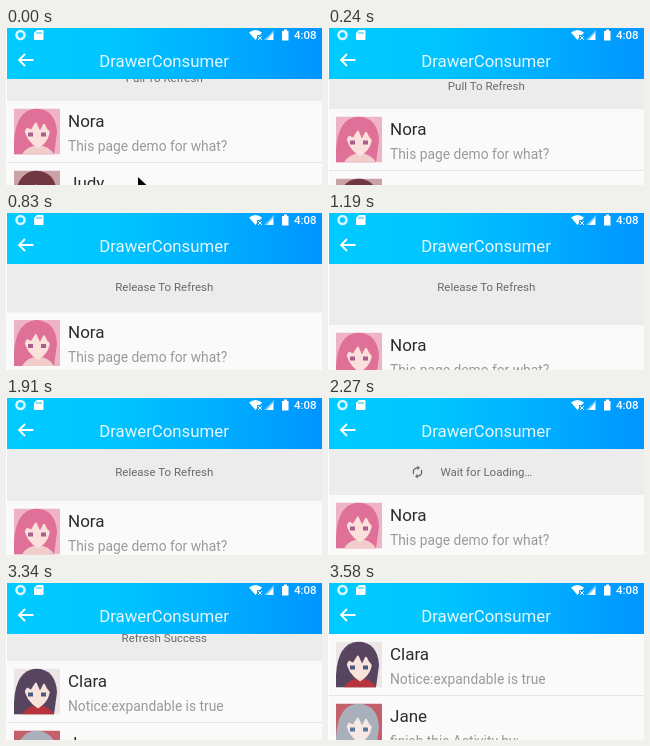
Animation of 316 by 157 pixels, one loop 3.76 s. Source, as an HTML page:

```html
<!DOCTYPE html>
<html lang="en">
<head>
<meta charset="utf-8">
<title>Pull to refresh</title>
<style>
  html, body { margin: 0; width: 100%; height: 100%; overflow: hidden; background: #ececec; }
  svg { display: block; width: 316px; height: 157px; font-family: Roboto, sans-serif; }
  .name { font-size: 17px; fill: #2b2b2b; }
  .note { font-size: 13.8px; fill: #9a9a9a; }
  #hint { font-size: 11.5px; fill: #6a6a6a; text-anchor: middle; }
</style>
</head>
<body>
<svg viewBox="0 0 316 157">
  <defs>
    <linearGradient id="sky">
      <stop stop-color="#00cbff"/>
      <stop offset=".35" stop-color="#00c4ff"/>
      <stop offset=".65" stop-color="#00b0ff"/>
      <stop offset="1" stop-color="#0095ff"/>
    </linearGradient>
    <clipPath id="square"><path d="M0 0h46v46H0z"/></clipPath>
  </defs>
  <rect width="316" height="157" fill="#ececec"/>
  <text id="hint" x="158.3"></text>
  <path id="spinner" fill="#666" d="M0-6v3l4-4-4-4v3c-4.4 0-8 3.6-8 8 0 1.6.5 3 1.2 4.3L-5.3 2.8C-5.7 2-6 1-6 0c0-3.3 2.7-6 6-6zM6.8-4.3 5.3-2.8C5.7-2 6-1 6 0c0 3.3-2.7 6-6 6V3l-4 4 4 4V8c4.4 0 8-3.6 8-8 0-1.6-.5-3-1.2-4.3z"/>
  <g id="before"></g>
  <g id="after"></g>

  <rect width="316" height="51" fill="url(#sky)"/>
  <g fill="#fff">
    <circle cx="14.500" cy="7" r="4" fill="none" stroke="#fff" stroke-width="2.6" opacity=".85"/>
    <path d="M31 2h5.500q1 0 1 1v8q0 1-1 1h-7.500q-1 0-1-1V5z"/>
    <path d="M31 4v2m2-2v2m2-2v2" stroke="#00c8ff"/>
    <path d="M243 4.500q6.500-5 13 0L254 7h-3v3l-1.500 2z"/>
    <path d="m252 8 4 4m0-4-4 4" stroke="#fff"/>
    <path d="M268 2v10h-10z" opacity=".45"/>
    <path d="M267 5v7h-6z"/>
    <path d="M276 3h2V1.500h3V3h1.500v9.500H276z"/>
    <text x="288" y="11" font-size="11.500" font-weight="500">4:08</text>
    <path d="M27.500 32H13m6-6-6 6 6 6" fill="none" stroke="#fff" stroke-width="1.8"/>
    <text x="158" y="38.500" font-size="16.8" text-anchor="middle" opacity=".9">DrawerConsumer</text>
  </g>
  <path id="cursor" d="M0 0v13l3-3 2.500 5.500 2.500-1-2.500-5h4.500z"/>
  <path d="M0 0h1v157H0z" fill="#fff"/>
</svg>
<script>
const $ = id => document.getElementById(id);

// Flat portrait: backdrop, hair, clothes, face, eyes, fringe
const avatar = ([back, hair, skin, cloth, eyes]) => `
  <g transform="translate(8 7.5)" clip-path="url(#square)">
    <path d="M0 0h46v46H0z" fill="${back}"/>
    <path d="M0 46Q-2 2 22 0q20 1 21 24l-3 22z" fill="${hair}"/>
    <path d="M8 46q5-9 16-9t16 9z" fill="${cloth}"/>
    <path d="M10 18q12-8 26 0 1 14-12 22-13-8-14-22z" fill="${skin}"/>
    <path d="M14 24h5v4h-5zm13 0h5v4h-5z" fill="${eyes}"/>
    <path d="M8 27Q7 7 23 6q15 1 15 20l-5-6-3-6-4 8-4-9-5 8-4-2z" fill="${hair}"/>
  </g>`;

const row = ([name, note, ...colors], i) => `
  <g transform="translate(0 ${i * 62})">
    <path d="M0 0h316v61H0z" fill="#fafafa"/>
    <path d="M0 61h316v2H0z" fill="#e4e4e4"/>
    ${avatar(colors)}
    <text class="name" x="62" y="25.7">${name}</text>
    <text class="note" x="62" y="49.7">${note}</text>
  </g>`;

const lists = {
  before: [
    ["Nora", "This page demo for what?", "#efb3c6", "#df7098", "#fbe0dc", "#f0cdca", "#a85f8c"],
    ["Judy", "", "#c9a3a6", "#713844", "#f6dcd4", "#8c3040", "#60404c"]
  ],
  after: [
    ["Clara", "Notice:expandable is true", "#ece6e6", "#574560", "#f8e3da", "#b8343c", "#4c5a80"],
    ["Jane", "finish this Activity by:", "#c4606a", "#a9b0bc", "#f8e8e3", "#d0d4dc", "#5878a0"]
  ]
};
for (const id in lists) $(id).innerHTML = lists[id].map(row).join("");

const LOOP = 3760, STEP = 120, REST = 97;

// [step, top of the list]
const path = [[0, 73], [4, 89], [5, 95], [6, 98], [7, 99.5], [8, 99.5], [9, 106], [10, 112],
  [11, 115], [12, 117], [15, 117], [16, 103], [17, 100], [18, 98], [19, REST], [26, REST],
  [27, 92], [28, 78], [29, 60], [30, 51], [31, 51]];

function topAt(n) {
  const i = path.findIndex(p => p[0] > n);
  const [a, from] = path[i - 1], [b, to] = path[i];
  return from + (to - from) * (n - a) / (b - a);
}

const hintAt = n => n < 6 ? "Pull To Refresh" : n < 19 ? "Release To Refresh"
  : n < 26 ? "Wait for Loading…" : "Refresh Success";

const place = (id, x, y, more = "") => $(id).setAttribute("transform", `translate(${x} ${y})${more}`);
const show = (id, on) => $(id).setAttribute("visibility", on ? "visible" : "hidden");

function draw(now) {
  const t = now % LOOP;
  const drift = t > 2800 ? 20 : t > 650 ? 10 : 0;
  const n = Math.min(30, Math.floor((t + drift) / STEP));
  const top = topAt(n), mid = Math.min(top, REST) - 23;

  $("hint").textContent = hintAt(n);
  $("hint").setAttribute("y", mid + 4);
  place("before", 0, top);
  place("after", 0, top);
  show("before", n < 26);
  show("after", n >= 26);
  show("spinner", n >= 19 && n < 26);
  const turn = 45 * Math.min(n - 19, 4);
  place("spinner", 89.5, 74, ` rotate(${turn}) scale(.6)`);
  place("cursor", 132, 149 + (top - 73) * 2.5);
  show("cursor", n < 5);
}

const start = performance.now();
function frame() {
  draw(performance.now() - start);
  requestAnimationFrame(frame);
}
frame();
</script>
</body>
</html>
```
